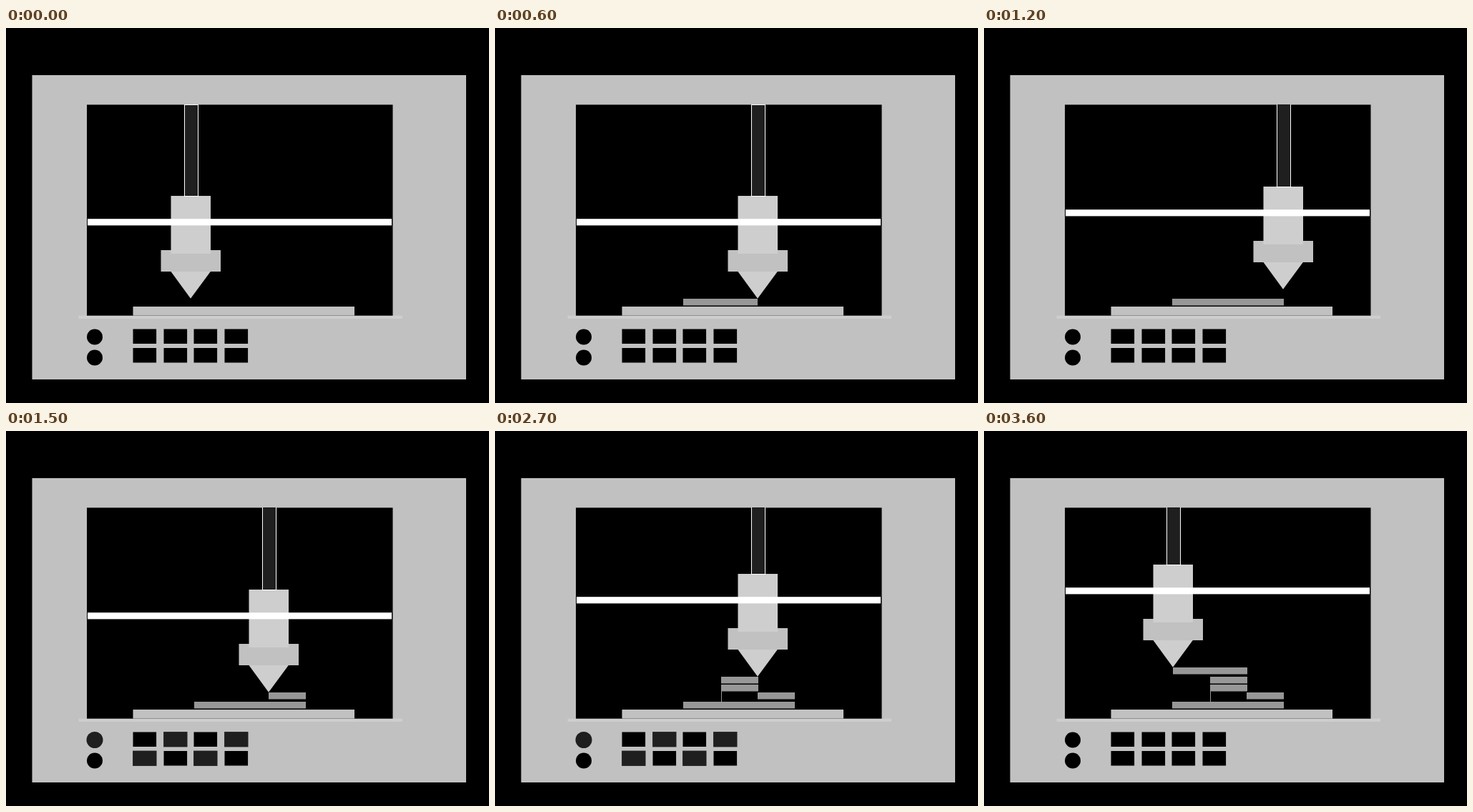
Recreate the animation shown at these times as an HTML page with a canvas. Size 675 by 525 pixels, loop 3.9 s.

```html
<!DOCTYPE html>
<html lang="en">
<head>
<meta charset="utf-8">
<title>3D printer</title>
<style>
html, body { margin: 0; width: 100%; height: 100%; overflow: hidden; background: #000; }
canvas { display: block; }
</style>
</head>
<body>
<canvas id="stage" width="675" height="525"></canvas>
<script>
const ctx = document.getElementById('stage').getContext('2d');
const STEP = 300;
const PANEL = '#c1c1c1', LIGHT = '#cecece', DARK = '#1f1f1f', PLASTIC = '#979797';

// Right and left moves lay one strip each, up moves raise the head a layer
const MOVES = 'RRRULULURULL';
const LIFT = [0, 13, 24, 35, 48];

const headX = (col, layer) => Math.round(5.7 + 51.5 * col + 0.16 * layer);
const stripX = (col, layer) => Math.round(263 + 52 * col + 0.3 * layer);

const poses = [{ dx: 0, up: 0 }];
const strips = [];
let col = 0, layer = 0;
for (const move of MOVES) {
  if (move === 'U') {
    layer++;
  } else {
    const next = col + (move === 'R' ? 1 : -1);
    strips.push({
      from: poses.length,
      left: stripX(Math.min(col, next), layer),
      right: stripX(Math.max(col, next), layer),
      top: 379 - LIFT[layer]
    });
    col = next;
  }
  poses.push({ dx: headX(col, layer), up: LIFT[layer] });
}

function box(x1, y1, x2, y2, color) {
  ctx.fillStyle = color;
  ctx.fillRect(x1, y1, x2 - x1, y2 - y1);
}

function dot(x, y, r, color) {
  ctx.fillStyle = color;
  ctx.beginPath();
  ctx.arc(x, y, r, 0, Math.PI * 2);
  ctx.fill();
}

function drawCase() {
  box(0, 0, 675, 525, '#000');
  box(36.5, 66, 643, 492, PANEL);
  box(113, 107.4, 540.5, 403, '#000');
}

function drawControls(lit) {
  dot(124, 432.5, lit ? 11.5 : 11, lit ? DARK : '#000');
  dot(124, 461.5, 11, '#000');
  for (let row = 0; row < 2; row++) {
    for (let i = 0; i < 4; i++) {
      const on = lit && (row + i) % 2 === 1;
      const grow = on ? 0.4 : 0;
      const x = 177.5 + Math.round(i * 42.6), y = 421.5 + row * 26.5;
      box(x - grow, y - grow, x + 32.6 + grow, y + 20.5 + grow, on ? DARK : '#000');
    }
  }
}

function drawHead({ dx, up }) {
  ctx.save();
  ctx.beginPath();
  ctx.rect(113, 107, 428, 296);
  ctx.clip();
  ctx.translate(dx, -up);
  box(216.5, 311, 300, 341, PANEL);
  box(230.5, 235, 286, 316, LIGHT);
  box(249, 107, 269, 236, '#fff');
  box(250, 108, 268, 235, DARK);
  ctx.fillStyle = LIGHT;
  ctx.beginPath();
  ctx.moveTo(230.5, 341);
  ctx.lineTo(285.8, 341);
  ctx.lineTo(258, 378.8);
  ctx.fill();
  ctx.restore();
  box(114, 267.2 - up, 539, 276.4 - up, '#fff');
}

function drawPrint(step) {
  const done = strips.filter(s => step >= s.from);
  for (const s of done) box(s.left, s.top, s.right, s.top + 9.5, PLASTIC);
  // thin support under the overhang
  if (done.length > 4) box(316, 364, 317, 379, PLASTIC);
}

function drawBed() {
  box(177.5, 390, 487, 402.6, PANEL);
  box(101.5, 402.7, 554, 407, LIGHT);
}

function draw(step) {
  drawCase();
  drawControls(step % 2 === 1);
  drawHead(poses[step]);
  drawPrint(step);
  drawBed();
}

const start = performance.now();
function tick() {
  const t = performance.now() - start;
  draw(Math.floor(t / STEP) % poses.length);
  requestAnimationFrame(tick);
}
tick();
</script>
</body>
</html>
```
